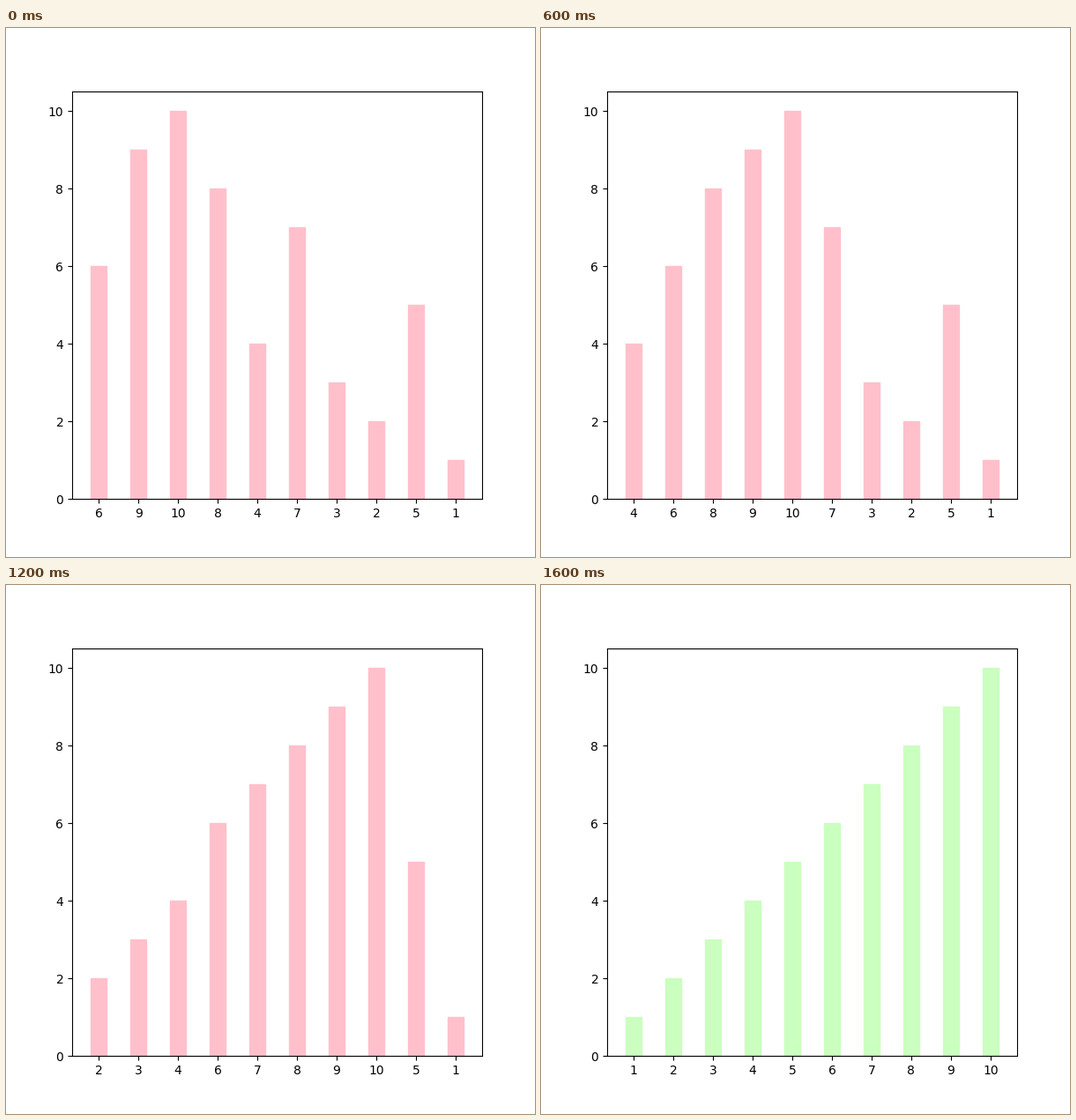
A matplotlib script that plays this animation: 600x600 px, repeating every 2800 ms.

```python
import matplotlib.pyplot as plt
from matplotlib.animation import FuncAnimation

VALUES = [6, 9, 10, 8, 4, 7, 3, 2, 5, 1]
COUNT = len(VALUES)
STEP_MS = 200
FRAMES = 14
BUSY, DONE = "pink", "#caffbf"

fig, ax = plt.subplots(figsize=(6, 6), dpi=100)
bars = ax.bar(range(COUNT), VALUES, width=0.4, color=BUSY)
ax.set_xticks(range(COUNT))


def insertion_state(frame):
    """Return the list with its leading part sorted, and that part's length."""
    size = min(max(frame + 2, 3), COUNT)
    return sorted(VALUES[:size]) + VALUES[size:], size


def update(frame):
    values, size = insertion_state(frame)
    color = DONE if size == COUNT else BUSY
    for bar, value in zip(bars, values):
        bar.set_height(value)
        bar.set_color(color)
    ax.set_xticklabels([str(v) for v in values])
    return list(bars)


anim = FuncAnimation(fig, update, frames=FRAMES, interval=STEP_MS,
                     init_func=lambda: update(0), repeat=True,
                     repeat_delay=0, blit=False)
plt.show()
```
